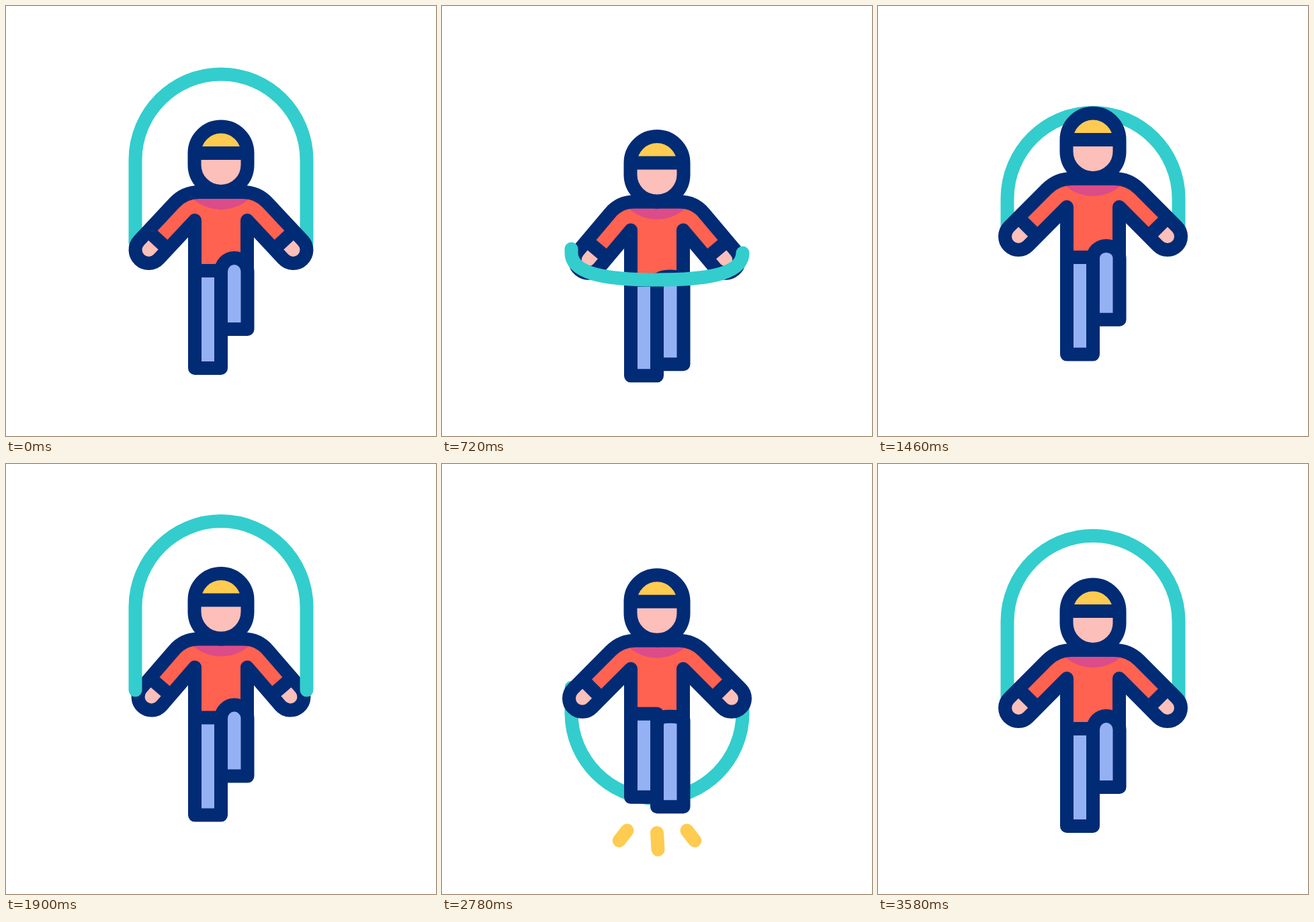
An HTML page with a canvas for the animation above (3.6 s loop, 640x640 px).

```html
<!DOCTYPE html>
<html lang="en">
<head>
<meta charset="utf-8">
<title>Jump rope</title>
<style>
  html, body { margin: 0; width: 100%; height: 100%; overflow: hidden; background: #fff; }
  canvas { display: block; width: 640px; height: 640px; }
</style>
</head>
<body>
<canvas id="stage" width="640" height="640"></canvas>
<script>
const ctx = document.getElementById('stage').getContext('2d');
const NAVY = '#022b75', TEAL = '#33cdcd', RED = '#ff6250', PINK = '#fdbfb9',
      PLUM = '#dc4c89', BLUE = '#94b1f4', GOLD = '#ffcb50';
const LOOP = 3600, TURN = 1820, LEAD = 60;
const UNDER = 870; // the rope passes below the feet

const clamp = u => Math.min(1, Math.max(0, u));
const mix = (a, b, u) => a + (b - a) * u;

// Eased step from 0 to 1 between two times
function ease(t, from, to) {
  const u = clamp((t - from) / (to - from));
  return u * u * (3 - 2 * u);
}

// Crouch, jump, crouch, jump, settle
const bob = t => 20.6 * ease(t, 0, 500)
  - 40.6 * (ease(t, 600, 1100) - ease(t, 1808, 2318) + ease(t, 2400, 2900))
  + 20 * ease(t, 3090, 3560);

// Within one turn of the rope
const ropeMid = ph => ph < UNDER
  ? 100.5 + 445 * ((ph - 40) / 840) ** 2
  : 538 - 431 * ease(ph, 835, 1680);
const handIn = ph => 16.6 * (1 - (1 - clamp((ph + LEAD) / 540)) ** 2 - ease(ph, 500, 960));
const rightReach = ph => .76 * (ease(ph, 225, 880) - ease(ph, 910, 1620));
const leftLift = ph => 29 * (ease(ph, 660, 950) - ease(ph, 950, 1500));

function stroke(path, color = NAVY) {
  ctx.strokeStyle = color;
  ctx.stroke(path);
}

function fill(path, color) {
  ctx.fillStyle = color;
  ctx.fill(path);
}

function line(x0, y0, x1, y1, color, cap = 'round') {
  const p = new Path2D();
  p.moveTo(x0, y0);
  p.lineTo(x1, y1);
  ctx.lineCap = cap;
  stroke(p, color);
  ctx.lineCap = 'round';
}

function drawSparks(ph) {
  const head = ease(ph, 840, 1040), tail = ease(ph, 1000, 1220);
  if (head - tail < .01) return;
  for (const side of [-1, 0, 1]) {
    const x = 320 + 44.5 * side, y = side ? 545.5 : 549;
    const dx = side ? 18 * side : 2.3, dy = side ? 23 : 38;
    line(x + dx * tail, y + dy * tail, x + dx * head, y + dy * head, GOLD);
  }
}

function drawRope(ph) {
  const mid = ropeMid(ph), end = 353, r = 127.5;
  const h = end - mid, ry = Math.sign(h) * Math.min(Math.abs(h), r), base = mid + ry;
  const lift = 6 * clamp((mid - 198) / 120);
  const round = .55 + .2 * (1 - Math.abs(ry) / r); // flatter loops get squarer ends
  const kx = r * (1 - round), ky = base - ry * round;
  stroke(new Path2D(`M192.5 ${end - lift}L192.5 ${base}
    C192.5 ${ky} ${192.5 + kx} ${mid} 320 ${mid}
    S447.5 ${ky} 447.5 ${base}V${end}`), TEAL);
}

function mirrored(draw) {
  draw();
  ctx.save();
  ctx.translate(640, 0);
  ctx.scale(-1, 1);
  draw();
  ctx.restore();
}

function drawShirt(ph) {
  const hx = 209 + handIn(ph), hy = 363, px = 281, py = 319;
  const a = Math.atan2(py - hy, px - hx) - Math.asin(20 / Math.hypot(px - hx, py - hy));
  const dx = Math.cos(a), dy = Math.sin(a);
  const corner = hx + 20 * dy + dx * (277 - hy + 20 * dx) / dy;

  const side = new Path2D();
  side.moveTo(px, 394);
  side.lineTo(px, py);
  side.arc(hx, hy, 20, a + Math.PI / 2, a + Math.PI * 1.5);
  side.lineTo(corner - 22 * dx, 277 - 22 * dy);
  side.quadraticCurveTo(corner, 277, corner + 22, 277);
  side.lineTo(321, 277);

  const cloth = new Path2D(side);
  cloth.lineTo(321, 394);

  const cx = hx + 20 * dx, cy = hy + 20 * dy;
  mirrored(() => {
    fill(cloth, RED);
    ctx.lineWidth = 24;
    line(hx, hy, mix(hx, cx, .5), mix(hy, cy, .5), PINK);
    ctx.lineWidth = 20;
  });
  fill(new Path2D('M276 285A63 63 0 0 0 364 285Z'), PLUM);
  mirrored(() => {
    stroke(side);
    line(cx - 20 * dy, cy + 20 * dx, cx + 20 * dy, cy - 20 * dx, NAVY, 'butt');
  });
}

function drawLegs(ph) {
  const up = leftLift(ph), k = rightReach(ph);
  const left = new Path2D(`M281 ${394 - .28 * up}H320V${539 - up}H281Z`);
  const right = new Path2D();
  right.moveTo(320, 481 + 58 * k);
  right.lineTo(320, 395);
  right.ellipse(339.75, 395, 19.75, 20 * (1 - k), 0, Math.PI, 2 * Math.PI);
  right.lineTo(359.5, 481 + 58 * k);
  right.closePath();
  for (const leg of [left, right]) {
    fill(leg, BLUE);
    stroke(leg);
  }
}

function drawHead() {
  const head = new Path2D(
    'M280.5 219A39.5 39.5 0 0 1 359.5 219V236.5A39.5 39.5 0 0 1 280.5 236.5Z');
  fill(head, PINK);
  fill(new Path2D('M284 219A36 36 0 0 1 356 219Z'), GOLD);
  stroke(head);
  line(281, 219, 359, 219, NAVY);
}

function draw(t) {
  const ph = (t + LEAD) % TURN - LEAD;
  const front = ph > 10 && ph < UNDER;
  ctx.fillStyle = '#fff';
  ctx.fillRect(0, 0, 640, 640);
  ctx.lineWidth = 20;
  ctx.lineCap = ctx.lineJoin = 'round';
  drawSparks(ph);
  ctx.save();
  ctx.translate(0, bob(t));
  if (!front) drawRope(ph);
  drawShirt(ph);
  drawLegs(ph);
  drawHead();
  if (front) drawRope(ph);
  ctx.restore();
}

const start = performance.now();
function tick() {
  draw((performance.now() - start) % LOOP);
  requestAnimationFrame(tick);
}
tick();
</script>
</body>
</html>
```
